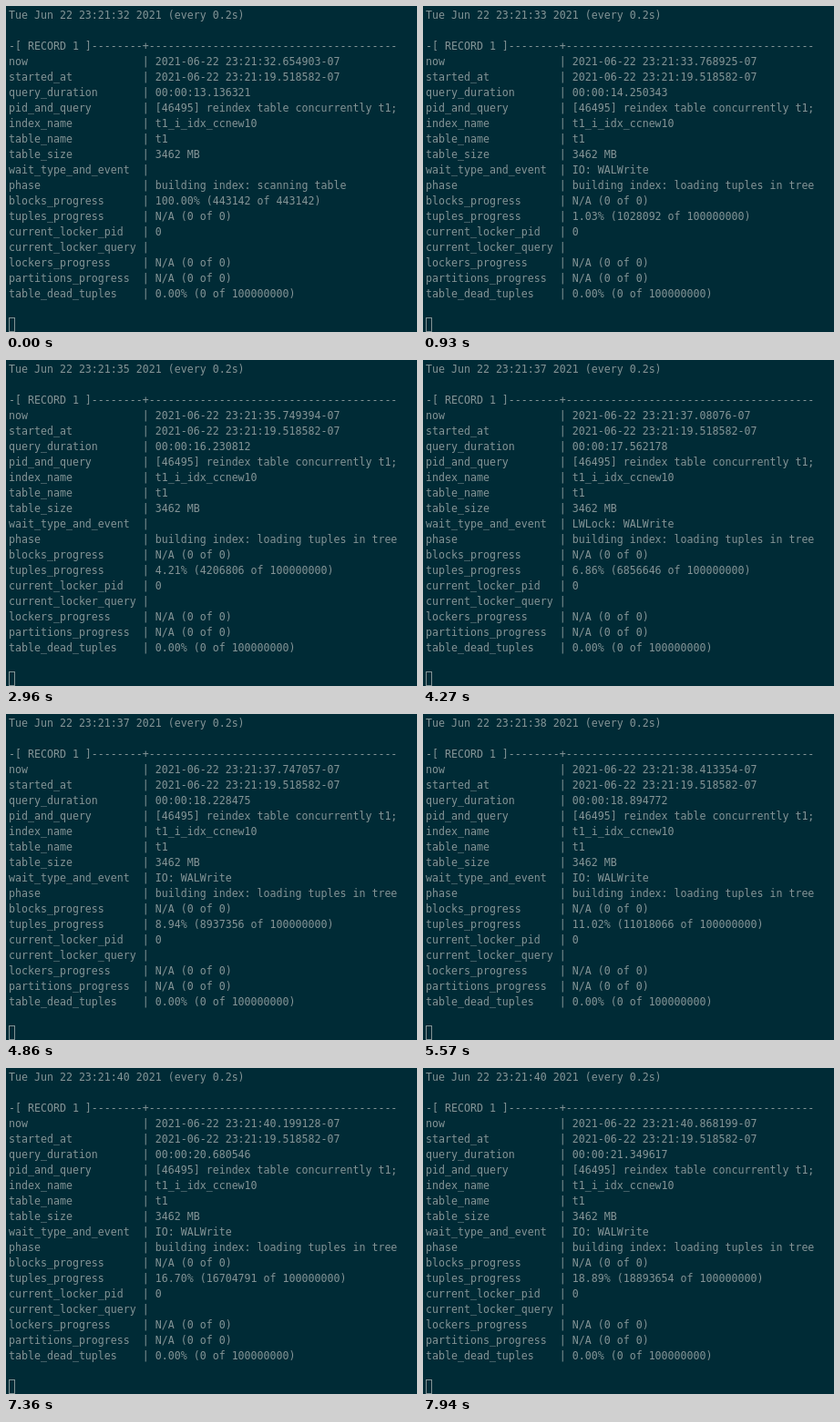
An HTML page that plays this animation: 451 px wide and 358 px high, repeating every 8000 ms.

```html
<!DOCTYPE html>
<html lang="en">
<head>
<meta charset="utf-8">
<title>Reindex progress</title>
<style>
  html, body { margin: 0; width: 100%; height: 100%; overflow: hidden; background: #002b36; }
  svg { display: block; }
  text { font: 11.628px "DejaVu Sans Mono", monospace; fill: #839496; white-space: pre; }
  rect { fill: none; stroke: #839496; }
</style>
</head>
<body>
<svg id="screen" width="451" height="358">
  <rect x="3.5" y="342.5" width="6" height="15"/>
</svg>
<script>
const LOOP = 8000, TOTAL = 1e8, STARTED = 19.518582;

// Moments (ms) at which the watch command refreshes
const refreshes = [
  0, 120, 360, 590, 700, 930, 1170, 1410, 1530, 1770, 2010,
  2250, 2490, 2730, 2960, 3200, 3440, 3560, 3910, 4030, 4270,
  4500, 4740, 4860, 5210, 5330, 5570, 5810, 6050, 6170, 6410,
  6650, 6880, 7120, 7360, 7470, 7710, 7940
];

// [refresh, clock seconds after 23:21, tuples loaded]
const samples = [
  [0, 32.654903, 0], [2, 33.100511, 12000], [8, 34.43734, 2044183],
  [10, 34.882945, 2721578], [14, 35.749394, 4206806], [20, 37.08076, 6856646],
  [26, 38.413354, 11018066], [31, 39.530061, 14515928],
  [32, 39.75308, 15245549], [37, 40.868199, 18893654]
];

const waits = {
  0: '', 1: '', 2: '', 14: '', 20: 'LWLock: WALWrite',
  31: 'IO: DataFileExtend', 35: '', 36: ''
};

const svg = document.getElementById('screen');
const rows = Array.from({ length: 19 }, (_, i) => {
  const row = document.createElementNS(svg.namespaceURI, 'text');
  row.setAttribute('x', 3);
  row.setAttribute('y', 14 + 17 * i);
  return svg.appendChild(row);
});

function sampleAt(step) {
  const next = Math.max(1, samples.findIndex(s => s[0] >= step));
  const a = samples[next - 1], b = samples[next];
  const f = (step - a[0]) / (b[0] - a[0]);
  return [a[1] + (b[1] - a[1]) * f, Math.round(a[2] + (b[2] - a[2]) * f)];
}

const seconds = s => s.toFixed(6).padStart(9, '0').replace(/0+$/, '');

function linesAt(step) {
  const [clock, tuples] = sampleAt(step);
  const none = 'N/A (0 of 0)';
  const loading = step >= 2;
  const fields = {
    now: `2021-06-22 23:21:${seconds(clock)}-07`,
    started_at: `2021-06-22 23:21:${seconds(STARTED)}-07`,
    query_duration: `00:00:${seconds(clock - STARTED)}`,
    pid_and_query: '[46495] reindex table concurrently t1;',
    index_name: 't1_i_idx_ccnew10',
    table_name: 't1',
    table_size: '3462 MB',
    wait_type_and_event: waits[step] ?? 'IO: WALWrite',
    phase: `building index: ${loading ? 'loading tuples in tree' : 'scanning table'}`,
    blocks_progress: loading ? none : '100.00% (443142 of 443142)',
    tuples_progress: loading
      ? `${(tuples / TOTAL * 100).toFixed(2)}% (${tuples} of ${TOTAL})` : none,
    current_locker_pid: '0',
    current_locker_query: '',
    lockers_progress: none,
    partitions_progress: none,
    table_dead_tuples: `0.00% (0 of ${TOTAL})`
  };
  return [
    `Tue Jun 22 23:21:${Math.floor(clock)} 2021 (every 0.2s)`,
    '',
    '-[ RECORD 1 ]'.padEnd(21, '-') + '+' + '-'.repeat(39),
    ...Object.entries(fields).map(([name, value]) => `${name.padEnd(21)}| ${value}`)
  ];
}

let shown = -1;
function draw() {
  const t = performance.now() % LOOP;
  const step = refreshes.findLastIndex(at => at <= t);
  if (step !== shown) {
    linesAt(step).forEach((line, i) => { rows[i].textContent = line; });
    shown = step;
  }
  requestAnimationFrame(draw);
}
draw();
</script>
</body>
</html>
```
